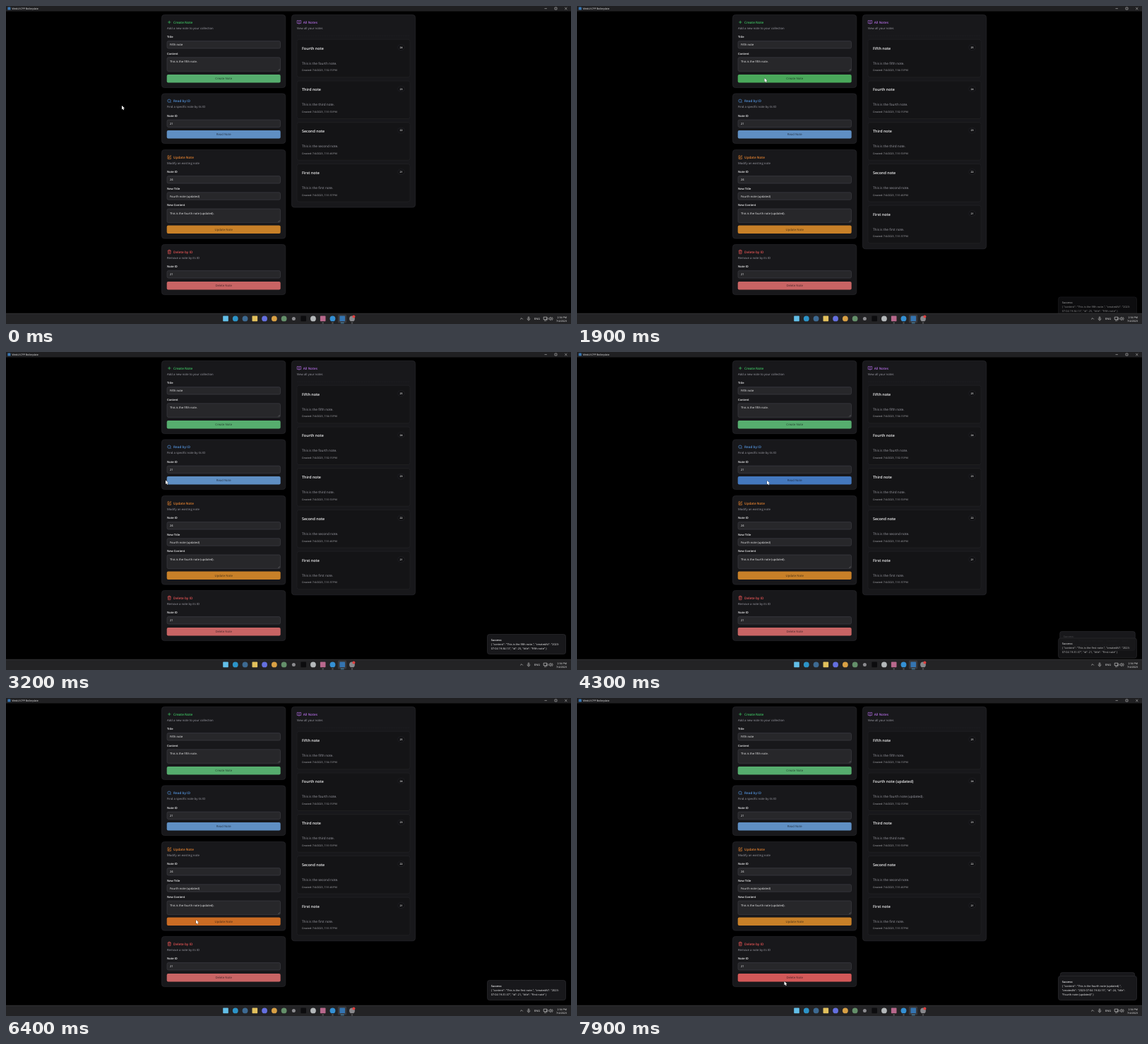
Animation of 800 by 450 pixels, one loop 8 s. Source, as an HTML page with a canvas:

```html
<!DOCTYPE html>
<html lang="en">
<head>
<meta charset="utf-8">
<title>Notes</title>
<style>
html, body { margin: 0; width: 100%; height: 100%; overflow: hidden; background: #000; }
canvas { display: block; width: 800px; height: 450px; }
</style>
</head>
<body>
<canvas id="stage" width="800" height="450"></canvas>
<script>
const ctx = document.getElementById('stage').getContext('2d');
ctx.textRendering = 'geometricPrecision';
ctx.textBaseline = 'alphabetic';

const LOOP = 8000, STEP = 100;
const WHITE = '#f4f4f5', GREY = '#a1a1aa', CARD = '#18181b', EDGE = '#2b2b2f';
const ADDED = 1770, READ = 4100, UPDATED = 6560, CLOSED = 5850;

const ICONS = {
  plus: 'M4 12H20M12 4V20',
  search: 'M19 11A8 8 0 1 1 3 11A8 8 0 1 1 19 11M21 21L16.7 16.7',
  edit: 'M11 4H4V21H20V13M18.5 2.5L21.5 5.5L12 15L8 16L9 12Z',
  trash: 'M3 6H21M5 6L6 22H18L19 6M8 6V2H16V6M10 11V17M14 11V17',
  book: 'M12 7V21L10 18H2V3H8Q12 3 12 7Q12 3 16 3H22V18H14L12 21'
};

// Each form: top, height, heading, fields [label, value, isArea], button colours and hover span
const FORMS = [
  { y: 12, h: 104, icon: 'plus', color: '#3fc463', title: 'Create Note', sub: 'Add a new note to your collection',
    fields: [['Title', 'Fifth note'], ['Content', 'This is the fifth note.', true]],
    base: [86, 173, 110], hot: [74, 168, 91], over: [800, 2250] },
  { y: 123.5, h: 71.5, icon: 'search', color: '#5596e0', title: 'Read by ID', sub: 'Find a specific note by its ID',
    fields: [['Note ID', '21']], base: [95, 143, 195], hot: [68, 120, 190], over: [3220, 4700] },
  { y: 203, h: 126.5, icon: 'edit', color: '#e88430', title: 'Update Note', sub: 'Modify an existing note',
    fields: [['Note ID', '24'], ['New Title', 'Fourth note (updated)'],
      ['New Content', 'This is the fourth note (updated).', true]],
    base: [200, 128, 40], hot: [203, 108, 36], over: [5620, 7150] },
  { y: 337, h: 72, icon: 'trash', color: '#e65555', title: 'Delete by ID', sub: 'Remove a note by its ID',
    fields: [['Note ID', '21']], base: [200, 100, 100], hot: [210, 88, 88], over: [7780, 9000] }
];

const NOTES = [['First', 21, '31:37'], ['Second', 22, '31:46'], ['Third', 23, '31:53'],
  ['Fourth', 24, '32:15'], ['Fifth', 25, '34:13']];

// Pointer path: time, x, y
const PATH = [[0, 164, 141], [200, 164, 141], [900, 265.5, 102], [2000, 265.5, 102], [2700, 233, 148],
  [2950, 200, 168], [3200, 226, 181.5], [3700, 269, 182], [4500, 269, 182], [5000, 198, 240],
  [5400, 210, 298], [5850, 269, 314], [6900, 269, 314], [7400, 281, 362], [7900, 293.5, 401], [8000, 293.5, 401]];

const clamp = v => Math.max(0, Math.min(1, v));

// CSS "ease" timing curve
function ease(p) {
  p = clamp(p);
  let lo = 0, hi = 1, s = p;
  for (let i = 0; i < 20; i++) {
    s = (lo + hi) / 2;
    const x = 3 * s * (1 - s) ** 2 * .25 + 3 * s * s * (1 - s) * .25 + s ** 3;
    if (x < p) lo = s; else hi = s;
  }
  return 3 * s * (1 - s) ** 2 * .1 + 3 * s * s * (1 - s) + s ** 3;
}

function text(str, x, y, size, color = WHITE, weight = 400, align = 'left') {
  ctx.font = `${weight} ${size}px "Open Sans", "Noto Sans", sans-serif`;
  ctx.textAlign = align;
  ctx.fillStyle = color;
  ctx.fillText(str, x, y);
}

function box(x, y, w, h, r, fill, edge) {
  ctx.beginPath();
  ctx.roundRect(x, y, w, h, r);
  ctx.fillStyle = fill;
  ctx.fill();
  if (!edge) return;
  ctx.strokeStyle = edge;
  ctx.lineWidth = .6;
  ctx.stroke();
}

function dot(x, y, r, color) {
  ctx.beginPath();
  ctx.arc(x, y, r, 0, 7);
  ctx.fillStyle = color;
  ctx.fill();
}

function line(d, color, width = .6) {
  ctx.strokeStyle = color;
  ctx.lineWidth = width;
  ctx.stroke(new Path2D(d));
}

function icon(name, x, y, color) {
  ctx.save();
  ctx.translate(x, y);
  ctx.scale(.27, .27);
  line(ICONS[name], color, 2.4);
  ctx.restore();
}

function heading(x, y, name, color, title, sub) {
  icon(name, x, y + 7.7, color);
  text(title, x + 9, y + 12.9, 4.7, color, 600);
  text(sub, x, y + 20.6, 4.23, GREY);
}

function form(f, t) {
  box(220.4, f.y + .4, 175.4, f.h - .8, 4, CARD, EDGE);
  heading(228, f.y, f.icon, f.color, f.title, f.sub);
  let y = f.y + 33.4;
  for (const [label, value, area] of f.fields) {
    text(label, 228, y, 4.05, WHITE, 600);
    const h = area ? 19.6 : 10.4;
    box(228, y + 4.2, 160.5, h, 2, '#27272a', '#414147');
    text(value, 232, y + (area ? 11.8 : 10.9), 4.1, WHITE, 500);
    if (area) line(`M385.3 ${y + 22.8}l2.2-2.2M386.7 ${y + 22.8}l.9-.9`, '#a0a0a0', .4);
    y += h + 12.8;
  }
  const mix = ease((t - f.over[0]) / 150) - ease((t - f.over[1]) / 150);
  const rgb = f.base.map((c, i) => c + (f.hot[i] - c) * mix);
  const top = f.y + f.h - 18.9;
  box(227.7, top, 161, 11.3, 2, `rgb(${rgb})`);
  text(f.title.replace(/ by ID/, ' Note'), 308.2, top + 7.2, 4.25, 'rgba(15,15,20,.72)', 400, 'center');
}

function notes(t) {
  const shown = NOTES.slice(0, t > ADDED ? 5 : 4).reverse();
  box(404.4, 12.4, 175.2, 38 + shown.length * 58.75 - .4, 4, CARD, EDGE);
  heading(411.7, 12, 'book', '#b06be0', 'All Notes', 'View all your notes');
  ctx.setLineDash([1.5, 1]);
  line('M412 42H572', '#27272b', .5);
  ctx.setLineDash([]);
  shown.forEach(([name, id, time], i) => {
    const y = 47.2 + i * 58.75;
    const tail = id === 24 && t > UPDATED ? ' (updated)' : '';
    box(412, y, 160, 53.6, 3, '#141416', '#242428');
    text(`${name} note${tail}`, 419, y + 14.4, 5.4, WHITE, 600);
    box(554.8, y + 7.6, 9.4, 7.4, 3.6, '#101012', '#28282c');
    text(id, 559.5, y + 12.6, 3.5, WHITE, 600, 'center');
    text(`This is the ${name.toLowerCase()} note${tail}.`, 419, y + 35.4, 4.7, GREY);
    text(`Created: 7/4/2023, 7:${time} PM`, 419, y + 45.2, 3.55, '#b4b4ba');
  });
}

const TOASTS = [
  { start: ADDED, covered: READ, end: CLOSED,
    rows: ['{ "content": "This is the fifth note.", "createdAt": "2023-', '07-04 19:34:13", "id": 25, "title": "Fifth note" }'] },
  { start: READ, covered: UPDATED, end: LOOP + 500,
    rows: ['{ "content": "This is the first note.", "createdAt": "2023-', '07-04 19:31:37", "id": 21, "title": "First note" }'] },
  { start: UPDATED, covered: Infinity, end: Infinity,
    rows: ['{ "content": "This is the fourth note (updated).",', '"createdAt": "2023-07-04 19:32:15", "id": 24, "title":', '"Fourth note (updated)" }'] }
];

function toast({ start, covered, end, rows }, i, t) {
  if (t < start || t > end + 400) return;
  const enter = ease((t - start) / 400), back = ease((t - covered) / 400);
  const next = TOASTS[i + 1], own = 16 + rows.length * 6;
  const h = own + (next ? (16 + next.rows.length * 6 - own) * back : 0);
  const scale = 1 - .05 * back;
  ctx.save();
  ctx.globalAlpha = enter * (1 - ease((t - end) / 200));
  ctx.translate(737, 427.5 - h / 2 + (1 - enter) * h - 5.8 * back);
  ctx.scale(scale, scale);
  box(-55.5, -h / 2, 111, h, 3, CARD, '#323237');
  ctx.globalAlpha *= 1 - back;
  text('Success:', -50.3, -h / 2 + 9, 3.85, WHITE, 600);
  rows.forEach((row, n) => text(row, -50.3, -h / 2 + 15.2 + n * 6, 3.85, WHITE));
  ctx.restore();
}

function titleBar() {
  box(0, 0, 800, 7.4, 0, '#202022');
  box(2.4, 1.6, 4, 4, .4, '#3a78b4');
  text('WebUI CPP Boilerplate', 8.5, 4.9, 3.55, WHITE);
  line('M762.5 3.6h3.4M777 2h3v3h-3zM791.2 2l3.2 3.2M794.4 2l-3.2 3.2', '#d8d8d8', .5);
}

function taskbar() {
  box(0, 435, 800, 15, 0, '#232325');
  box(0, 434.8, 800, .7, 0, '#39393b');
  box(469.8, 436.6, 12.4, 12, 1.5, '#38383b');
  const apps = ['#62bfe8', '#2c94c8', '#3d6a92', '#e2c05c', '#6470e0', '#d8a044', '#64906a',
    '#8c8c90', '#0c0c0e', '#b4b8ba', '#b8688c', '#3490d4', '#3474b0', '#88888c'];
  const square = [0, 3, 8, 10, 12];
  apps.forEach((color, i) => {
    const x = 311 + i * 13.77;
    if (square.includes(i)) box(x - 3.8, 438.6, 7.6, 7.6, .8, color);
    else dot(x, 442.4, i === 7 ? 2.5 : 3.9, color);
    if (i > 9) box(x - (i === 12 ? 2.5 : 1.2), 448.2, i === 12 ? 5 : 2.4, .9, .4, i === 12 ? '#58b4e8' : '#909094');
  });
  dot(492.4, 439.5, 2, '#e04040');
  line('M728.2 443.4l1.8-1.8l1.8 1.8', '#e0e0e0');
  line('M739.2 440h1.6v3h-1.6zM738 442.4q0 2 2 2q2 0 2-2M740 444.4v1.2', '#d8d8d8', .5);
  text('ENG', 752, 444, 3.9, WHITE, 400, 'center');
  line('M761.2 440.2h4.8v3.4h-4.8zM762 445.2h3.2M766 441v3.6', '#e0e0e0', .6);
  line('M768.6 441.6h1l1.6-1.4v4.6l-1.6-1.4h-1zM772.2 441.2q1.2 1.3 0 2.6M773.2 440.2q2 2.3 0 4.6', '#e0e0e0', .5);
  text('2:34 PM', 794, 441.5, 3.6, WHITE, 400, 'right');
  text('7/4/2023', 794, 446.6, 3.6, WHITE, 400, 'right');
}

// Hermite path with rests wherever the pointer holds still
function pointer(t) {
  let i = 0;
  while (i < PATH.length - 2 && PATH[i + 1][0] <= t) i++;
  const a = PATH[i], b = PATH[i + 1], span = b[0] - a[0], p = clamp((t - a[0]) / span);
  const slope = (k, c) => {
    const u = PATH[k - 1], v = PATH[k], w = PATH[k + 1];
    if (!u || !w || (u[1] === v[1] && u[2] === v[2]) || (w[1] === v[1] && w[2] === v[2])) return 0;
    return (w[c] - u[c]) / (w[0] - u[0]) * span;
  };
  const at = c => a[c] + (b[c] - a[c]) * p * p * (3 - 2 * p)
    + slope(i, c) * p * (1 - p) ** 2 - slope(i + 1, c) * p * p * (1 - p);
  ctx.save();
  ctx.translate(at(1), at(2));
  const arrow = new Path2D('M0 0V5.4L1.3 4.2L2.2 6.2L3.2 5.8L2.3 3.8H4Z');
  ctx.fillStyle = '#fff';
  ctx.strokeStyle = '#111';
  ctx.lineWidth = .5;
  ctx.stroke(arrow);
  ctx.fill(arrow);
  ctx.restore();
}

function draw(now) {
  const t = Math.floor((now % LOOP) / STEP) * STEP;
  ctx.fillStyle = '#000';
  ctx.fillRect(0, 0, 800, 450);
  FORMS.forEach(f => form(f, t));
  notes(t);
  TOASTS.forEach((item, i) => toast(item, i, t));
  titleBar();
  taskbar();
  pointer(t);
}

const begin = performance.now();
function tick() {
  draw(performance.now() - begin);
  requestAnimationFrame(tick);
}
tick();
</script>
</body>
</html>
```
